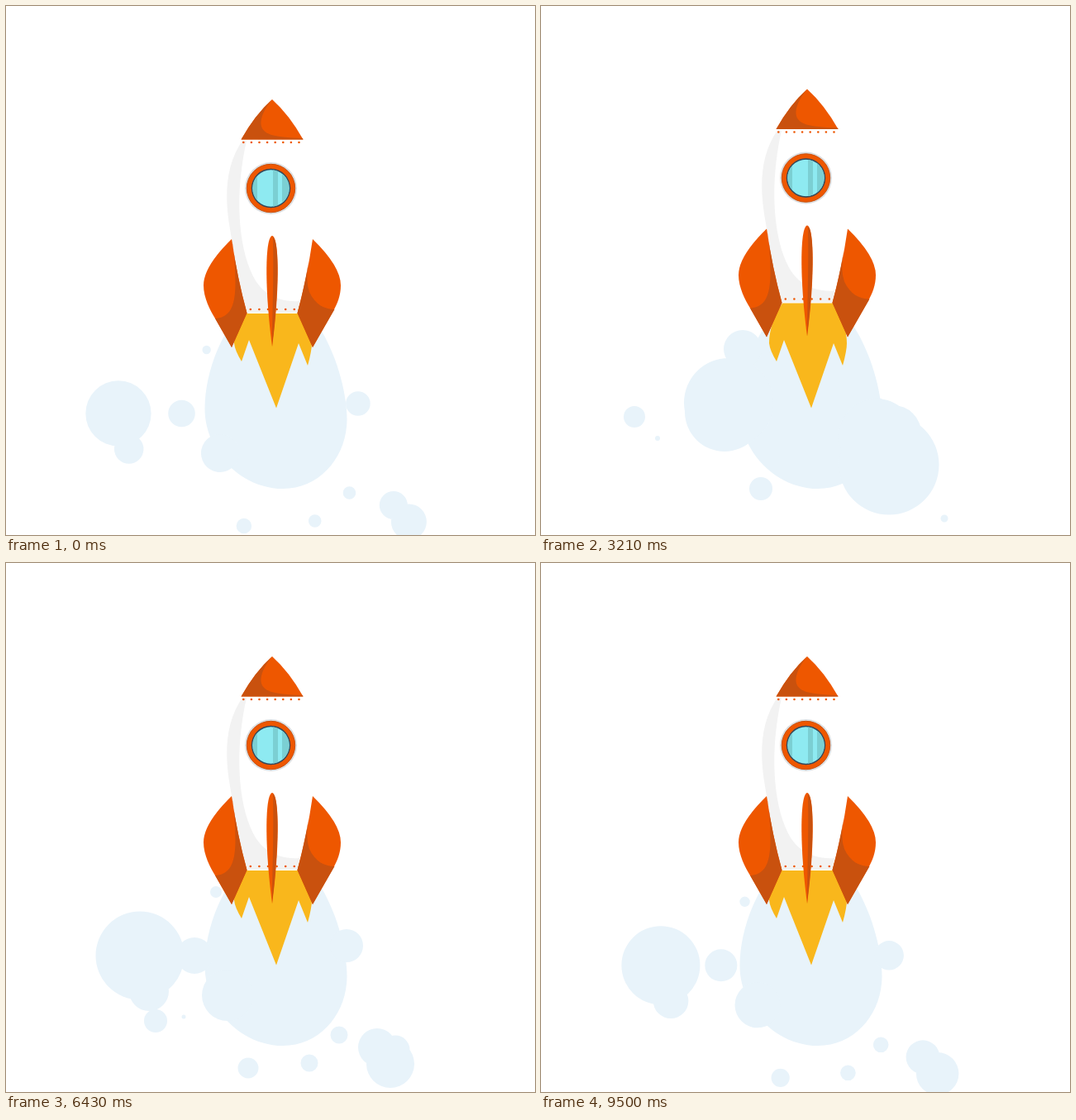
An HTML page for the animation above (9.57 s loop, 640 by 640 pixels).

```html
<!DOCTYPE html>
<html lang="en">
<head>
<meta charset="utf-8">
<title>Rocket</title>
<style>
  html, body { margin: 0; height: 100%; overflow: hidden; background: #fff; }
  svg { display: block; width: 100vw; height: 100vh; }
</style>
</head>
<body>
<svg viewBox="0 0 640 640">
  <g fill="#e8f3fa">
    <path id="trail"/>
    <path id="puffs"/>
  </g>
  <path id="flame" fill="#f9b71c"/>
  <g id="rocket">
    <path fill="#fff" d="M286 161C262 200 268 260 273 282Q280 330 291.500 372H352.500Q364 330 371 282C378 240 378 200 358 161Z"/>
    <path fill="#f2f2f2" d="M286 163C267 190 264 225 270 264L273 282Q280 330 291.500 371H352.500L355 357C326 359 308 345 299 327C280 290 277 225 291 163Z"/>
    <g fill="#ee5700">
      <path d="M273 282Q239 315 239 338C239 353 247 368 253 378L273 413L291.500 371.500Q280 330 273 282Z"/>
      <path d="M371 282Q405 315 405 338C405 350 401 360 396 369L371 413L352.500 371.500Q364 330 371 282Z"/>
      <path d="M322 113Q343 132 359.500 161.500H284.500Q301 132 322 113Z"/>
    </g>
    <g fill="#c9510e">
      <path d="M273 282Q277 300 277.500 335C277.500 365 270 377 253 378L273 413L291.500 371.500Q280 330 273 282Z"/>
      <path d="M366 310Q362 332 367 346C374 361 385 367 397.500 367L371 413L352.500 371.500Q361 340 366 310Z"/>
      <path d="M322 113C312 125 308 135 308.500 143C310 155 322 159 359 160L359.500 161.500H284.500Q301 132 322 113Z"/>
    </g>
    <g stroke="#ee5700" stroke-width="2.600" stroke-linecap="round">
      <path d="M287.300 165H356" stroke-dasharray="0 9.600"/>
      <path d="M295.800 367H350" stroke-dasharray="0 10.600"/>
    </g>
    <path fill="#ee5700" d="M322 278C313 280 313 345 322 412C331 345 331 280 322 278Z"/>
    <path fill="#c9510e" d="M323 279C331 284 330 350 322 412C322 385 324 330 323 279Z"/>
    <circle cx="320.500" cy="220.500" r="31.500" fill="#dcdee0"/>
    <circle cx="320.500" cy="220.500" r="29.200" fill="#ee5700" stroke="#c9510e"/>
    <circle cx="320.500" cy="220.500" r="23.700" fill="#34475a"/>
    <clipPath id="glass"><circle cx="320.500" cy="220.500" r="22.200"/></clipPath>
    <g clip-path="url(#glass)">
      <path fill="#8eeaf1" d="M298 198h45v45h-45z"/>
      <path fill="#7bcfd3" d="M298 198h6v45h-6zM323 198h6v45h-6zM334 198h9v45h-9z"/>
    </g>
  </g>
</svg>
<script>
const LOOP = 9570, BEAT = LOOP / 21, FLICKER = LOOP / 9;
const GROW = 350, REST = 100, LIFE = 970;
const NOZZLE = { x: 325, y: 470 };

const $ = id => document.getElementById(id);
const clamp = x => Math.max(0, Math.min(1, x));
const smooth = x => x * x * (3 - 2 * x);
const mix = (a, b, k) => a + (b - a) * k;
const bump = (x, centre, width) => Math.cos(clamp(Math.abs(x - centre) / width) * Math.PI / 2) ** 2;

// beats: when the cloud lets go; puffs: x, y and radius at rest
const CLOUDS = [
  { beats: [2, 5, 8, 14, 17, 20], drift: 1, puffs: [
    [162, 475, 53.5], [228, 475, 22], [173, 518, 24], [254, 398, 7], [268, 523, 31], [412, 463, 20],
    [403, 571, 10.5], [367, 605, 10.5], [293, 611, 12.5], [449, 586, 23], [465, 606, 29]] },
  { beats: [1, 3, 7, 12, 16, 19], drift: 0.4, puffs: [
    [113, 497, 13], [141, 523, 3], [266, 584, 14], [488, 620, 4.5], [222, 491, 48], [195, 511, 6],
    [406, 521, 46], [426, 517, 34], [438, 547, 24]] },
  { beats: [4, 10, 14], drift: 0.4, puffs: [
    [181, 554, 14], [215, 549, 2.5], [448, 587, 17], [471, 589, 17.5]] },
  { beats: [7, 11], drift: 0.4, puffs: [
    [227, 480, 54], [244, 415, 23], [421, 555, 60.5], [406, 490, 16]] }
];

function circle(x, y, r) {
  return `M${x - r} ${y}a${r} ${r} 0 1 0 ${2 * r} 0a${r} ${r} 0 1 0 ${-2 * r} 0Z`;
}

// A cloud swells out of the nozzle, rests, then drifts out and shrinks
function puffPath(t) {
  let d = '';
  for (const { beats, drift, puffs } of CLOUDS) for (const beat of beats) {
    const age = (t - beat * BEAT - 88 + GROW + REST + LOOP) % LOOP;
    if (age > LIFE) continue;
    const grown = 1 - (1 - clamp(age / GROW)) ** 3;
    const away = (Math.max(0, age - GROW - REST) / 369) ** 2;
    const scale = grown * Math.max(0, 1 - 0.26 * away * away);
    for (const [x, y, r] of puffs) {
      const farX = x + (x - NOZZLE.x) * 0.16 * drift * away;
      const farY = y + 18 * drift * away;
      d += circle(mix(NOZZLE.x, farX, grown), mix(NOZZLE.y, farY, grown), r * scale);
    }
  }
  return d;
}

// The rocket alternately hops up and drops back
function hop(t) {
  return [227, 1150, 1645, 3195, 3700, 4075].reduce(
    (lift, start, i) => lift + (i % 2 ? -1 : 1) * smooth(clamp((t - start) / 210)), 0);
}

function draw() {
  const t = performance.now() % LOOP;
  const phase = t % FLICKER;
  const flare = bump(phase, 347, 295), swell = bump(phase, 807, 180);

  const notch = 404 + 37 * flare + 14 * swell;
  const tip = 486.5 + 36 * flare - 8.5 * swell;
  const tipL = 430 + 33 * flare + 17 * swell;
  const tipR = 435 + 35 * flare + 5 * swell;
  const inset = 5 * flare;
  const left = 240.5 + 11.5 * flare, right = 412.5 - 12.5 * flare;
  const bottom = 584 + 39 * flare - 2 * swell;

  $('rocket').setAttribute('transform', `translate(0 ${-12.7 * hop(t % (LOOP / 2))})`);
  $('flame').setAttribute('d', `M${293 + inset} 358C282 374 276 392 276 408Q277 ${tipL - 13} 285 ${tipL}` +
    `L294 ${notch}L327 ${tip}L354 ${notch + 4}L365 ${tipR}Q370 ${tipR - 18} 370 408` +
    `C370 392 364 374 ${352 - inset} 358Z`);
  $('trail').setAttribute('d', `M322 340C275 360 ${left} 430 ${left} 487C${left} 540 285 ${bottom} 335 ${bottom}` +
    `C380 ${bottom} ${right} 545 ${right} 500C${right} 455 385 360 322 340Z`);
  $('puffs').setAttribute('d', puffPath(t));
  requestAnimationFrame(draw);
}
draw();
</script>
</body>
</html>
```
